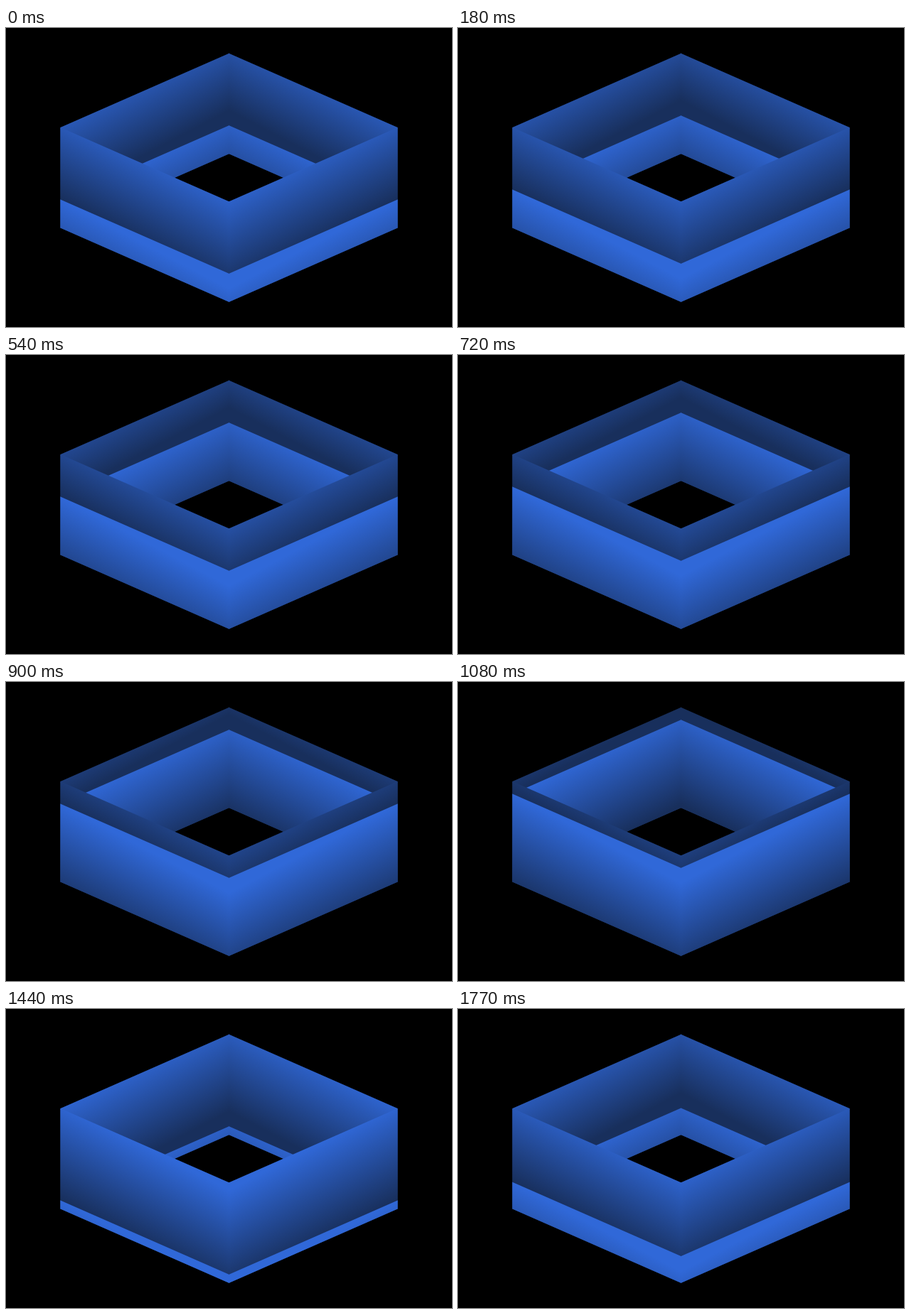
Animation, 627 px wide and 421 px high, one loop 1800 ms. Source, as an HTML page with a canvas:

```html
<!DOCTYPE html>
<html lang="en">
<head>
<meta charset="utf-8">
<title>Endless box</title>
<style>
html, body { margin: 0; width: 100%; height: 100%; overflow: hidden; background: #000; }
canvas { display: block; }
</style>
</head>
<body>
<canvas id="stage" width="627" height="421"></canvas>
<script>
const ctx = document.getElementById('stage').getContext('2d');
const LOOP = 1800, STEP = 30;
const MID = 313.5, HALF = 237, SIDE = 140, RISE = 104.5;
const WALL = 141.5, BAND = 140;
const TILT = 21; // extra slope of the shading towards the middle edge

// side: -1 left, 1 right; dir: -1 back wall, 1 front wall
function drawFace(side, dir, edge) {
  const far = MID + side * HALF;
  const near = MID - side * 0.5; // small overlap hides the seam
  const w = -side * HALF, m = dir * (RISE + TILT);
  const k = w * BAND / (w * w + m * m);

  for (let y = edge - BAND; y < WALL; y += BAND) {
    const top = Math.max(0, y);
    const y0 = SIDE + y;
    const shade = ctx.createLinearGradient(far, y0, far - m * k, y0 + w * k);
    shade.addColorStop(0, '#3068d8');
    shade.addColorStop(1, '#182f5c');
    ctx.fillStyle = shade;
    ctx.beginPath();
    ctx.moveTo(far, SIDE + top);
    ctx.lineTo(near, SIDE + dir * RISE + top);
    ctx.lineTo(near, SIDE + dir * RISE + WALL);
    ctx.lineTo(far, SIDE + WALL);
    ctx.fill();
  }
}

function draw(now) {
  const t = Math.floor(now % LOOP / STEP) * STEP / LOOP;
  const edge = (101.5 - BAND * t + BAND) % BAND;
  ctx.clearRect(0, 0, 627, 421);
  for (const dir of [-1, 1])
    for (const side of [-1, 1]) drawFace(side, dir, edge);
}

let start;
function tick(now) {
  start ??= now;
  draw(now - start);
  requestAnimationFrame(tick);
}
draw(0);
requestAnimationFrame(tick);
</script>
</body>
</html>
```
